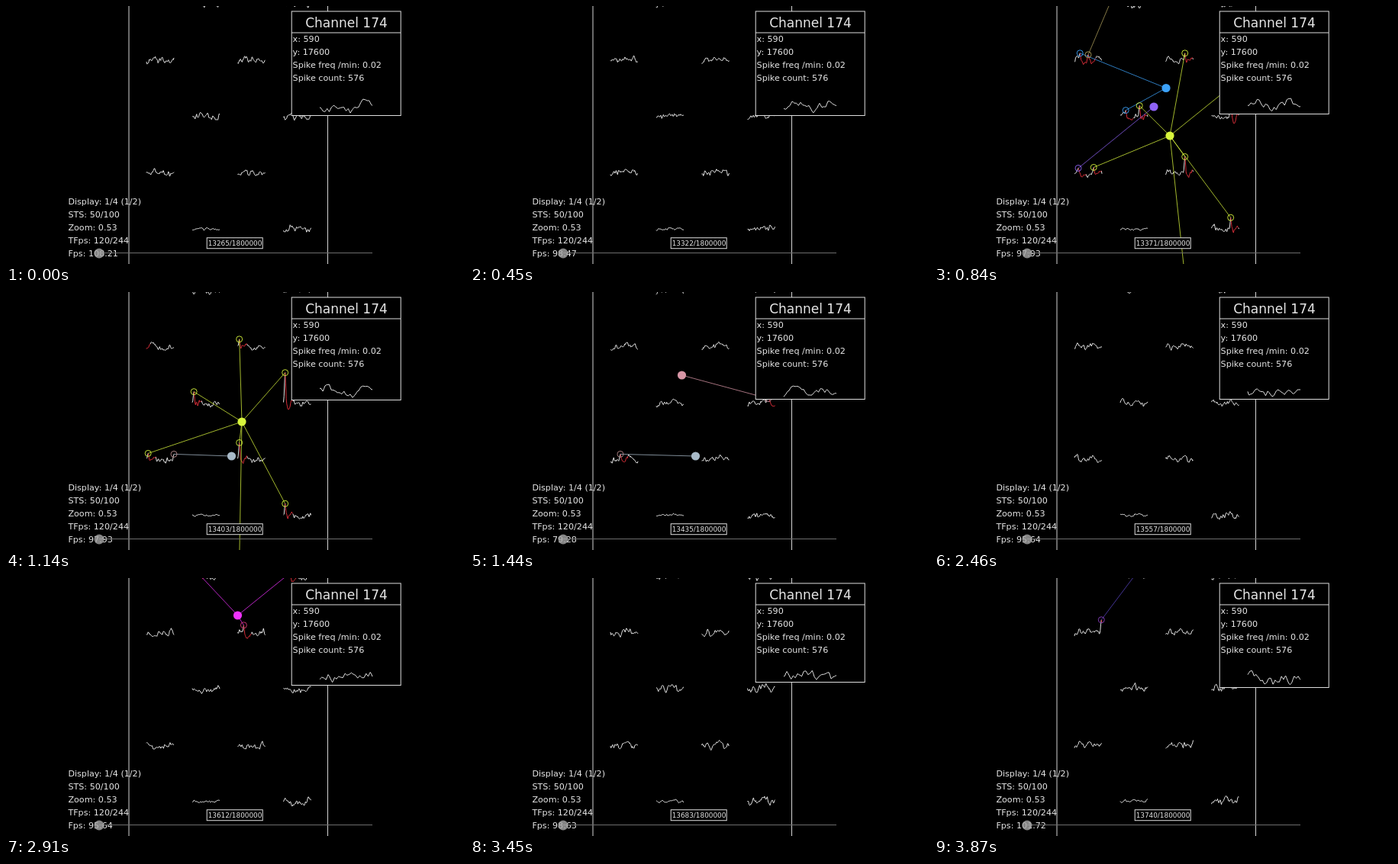
Recreate the animation shown at these times as an HTML page. Size 600 by 338 pixels, loop 3.9 s.

```html
<!DOCTYPE html>
<html lang="en">
<head>
<meta charset="utf-8">
<title>Channel monitor</title>
<style>
html, body { margin: 0; width: 100%; height: 100%; overflow: hidden; background: #000; }
svg { display: block; width: 600px; height: 338px; }
text { font: 11.15px "DejaVu Sans", sans-serif; fill: #e6e6e6; white-space: pre; }
.title { font-size: 17px; text-anchor: middle; }
.count { font-size: 8.9px; text-anchor: middle; }
.frame { fill: #000; stroke: #ddd; }
.trace { fill: none; stroke: #f0f0f0; stroke-width: .95; stroke-linejoin: round; }
.red { stroke: #e0303c; }
</style>
</head>
<body>
<svg viewBox="0 0 600 338">
  <path d="M161 0V338M421.5 0V338" stroke="#d4d4d4"/>
  <path id="white" class="trace"/>
  <path id="red" class="trace red"/>
  <g id="units"></g>
  <rect id="panel" class="frame" x="374.2" y="7" width="143"/>
  <path d="M374 35H517" stroke="#ddd"/>
  <text class="title" x="446" y="28">Channel 174</text>
  <g id="info"></g>
  <path id="zoomed" class="trace"/>
  <g id="status"></g>
  <path d="M122 323.5H480" stroke="#6c6c6c"/>
  <circle cx="122" cy="324" r="6.5" fill="#a6a6a6" fill-opacity=".8"/>
  <rect class="frame" x="263.2" y="303.7" width="73" height="14"/>
  <text class="count" x="300" y="314.2" id="count"></text>
</svg>
<script>
const LOOP = 3900, STEP = 30;
const SPAN = 50, WIDTH = 36, RED = 14; // samples shown, trace width, samples marked after a spike
const $ = id => document.getElementById(id);

// [time in ms, sample counter]
const PACE = [[0, 13265], [840, 13371], [1440, 13435], [2010, 13502],
  [2910, 13612], [3450, 13683], [3870, 13740]];
const FPS = [108.21, 98.47, 97.93, 79.28, 88.25, 95.64, 98.63, 101.72];

// Staggered electrode grid, two per row
const QUIET = 8;
const channels = Array.from({ length: 12 }, (_, n) => {
  const row = n >> 1;
  return { x: (row % 2 ? 184 : 244) + 119.5 * (n % 2), y: -3 + 73.8 * row, gain: n === QUIET ? .4 : 1 };
});

// Each unit fires once; hits maps a channel to its spike height
const UNITS = [
  { at: 13328, color: "#8e62f5", x: 288, y: 132, hits: { 6: 6 } },
  { at: 13331, color: "#3ca2fa", x: 304, y: 107.5, hits: { 2: 9, 4: 8 } },
  { at: 13346, color: "#b0a05c", x: 240, y: -26, hits: { 2: 7 } },
  { at: 13356, color: "#d8f53c", x: 309, y: 170,
    hits: { 3: 9, 4: 14, 5: 39, 6: 7, 7: 21, 9: 15, 11: 11 } },
  { at: 13403, color: "#a8bac8", x: 295.5, y: 215, ring: "#b98a8c", hits: { 6: 6 } },
  { at: 13423, color: "#d896a6", x: 277.5, y: 109, hits: { 5: 5 } },
  { at: 13469, color: "#74f796", x: 304, y: 43.5, hits: { 1: 11 } },
  { at: 13573, color: "#f032ff", x: 303.5, y: 49, ring: "#d83a78", hits: { 0: 3, 1: 3, 3: 9 } },
  { at: 13739, color: "#5a46c4", x: 280, y: -26, ring: "#8a40c0", hits: { 2: 16 } }
];

const lerp = (a, b, f) => a + (b - a) * f;
const bell = (d, w) => Math.exp(-(d / w) * (d / w));
const point = (x, y) => x.toFixed(2) + " " + y.toFixed(2);

function random(seed, n) {
  const s = Math.sin((n % 4096) * 12.9898 + seed * 78.233) * 43758.5453;
  return (s - Math.floor(s)) * 2 - 1;
}

// Smooth noise from -1 to 1 with one random knot per unit of p
function wave(seed, p) {
  const n = Math.floor(p), f = p - n;
  return lerp(random(seed, n), random(seed, n + 1), f * f * (3 - 2 * f));
}

function level(ch, i) {
  const { y, gain } = channels[ch];
  let v = gain * (4.5 * wave(40, i / 6) + 3 * wave(ch, i / 2.3) + .8 * random(ch + 20, i));
  for (const { at, hits } of UNITS) {
    const h = hits[ch];
    if (!h) continue;
    const d = i - at, up = bell(d, 1.6);
    v = lerp(v, -h, up) + Math.min(h * .4, 13) * bell(d - 7, 3);
  }
  return y + v;
}

const zoomLevel = i =>
  131 + 5 * wave(50, i / 14) + 5 * wave(51, i / 5) + 3.5 * wave(52, i / 2);

const xAt = (ch, i, now) => channels[ch].x + WIDTH * (1 - (now - i) / SPAN);
const isRed = (ch, i) => UNITS.some(u => u.hits[ch] && i >= u.at && i < u.at + RED);

function drawTraces(now) {
  const paths = { white: "", red: "" };
  channels.forEach((_, ch) => {
    let last = null;
    for (let i = now - SPAN; i <= now; i++) {
      const p = point(xAt(ch, i, now), level(ch, i));
      const kind = isRed(ch, i - 1) ? "red" : "white";
      if (last) paths[kind] += (last.kind === kind ? "" : "M" + last.p) + "L" + p;
      last = { p, kind: last ? kind : null };
    }
  });
  for (const kind in paths) $(kind).setAttribute("d", paths[kind]);
}

function drawUnits(now) {
  let out = "";
  for (const { at, color, x, y, ring = color, hits } of UNITS) {
    if (now < at || now - at > SPAN) continue;
    for (const ch in hits) {
      const hx = xAt(ch, at, now), hy = level(+ch, at);
      out += `<path d="M${point(x, y)}L${point(hx, hy)}" stroke="${color}" stroke-opacity=".75"/>` +
        `<circle cx="${hx}" cy="${hy}" r="4" fill="none" stroke="${ring}" stroke-opacity=".9"/>`;
    }
    out += `<circle cx="${x}" cy="${y}" r="5.6" fill="${color}"/>`;
  }
  $("units").innerHTML = out;
}

// The panel always ends just under its trace
function drawPanel(now) {
  let low = 0;
  const pts = [];
  for (let i = now - SPAN; i <= now; i++) {
    const y = zoomLevel(i);
    low = Math.max(low, y);
    pts.push(point(411 + (i - now + SPAN) * 69 / SPAN, y));
  }
  $("zoomed").setAttribute("d", "M" + pts.join("L"));
  $("panel").setAttribute("height", Math.round(low) + 3.5 - 7);
}

function counter(t) {
  const k = Math.max(1, PACE.findIndex(p => t <= p[0]));
  const [t0, c0] = PACE[k - 1], [t1, c1] = PACE[k];
  return Math.round(lerp(c0, c1, (t - t0) / (t1 - t0)));
}

function addLines(id, x, y, lines) {
  $(id).innerHTML = lines.map((s, n) => `<text x="${x}" y="${y + n * 16.95}">${s}</text>`).join("");
  return $(id).lastChild;
}

addLines("info", 375.6, 47, ["x: 590", "y: 17600", "Spike freq /min: 0.02", "Spike count: 576"]);
const fps = addLines("status", 81.4, 260.2,
  ["Display: 1/4 (1/2)", "STS: 50/100", "Zoom: 0.53", "TFps: 120/244", ""]);

function render(t) {
  const now = counter(t);
  drawTraces(now);
  drawUnits(now);
  drawPanel(now);
  $("count").textContent = now + "/1800000";
  fps.textContent = "Fps: " + FPS[Math.floor((t + 270) / 540)].toFixed(2);
}

const begin = performance.now();
let shown = -1;
function tick() {
  const t = Math.floor((performance.now() - begin) % LOOP / STEP) * STEP;
  if (t !== shown) render(shown = t);
  requestAnimationFrame(tick);
}
tick();
</script>
</body>
</html>
```
